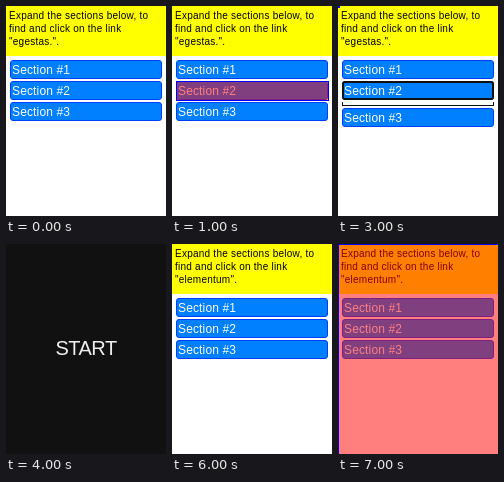
Write an HTML page that moves like this. It is 160 px wide and 210 px high and loops after 8000 ms.

```html
<!DOCTYPE html>
<html lang="en">
<head>
<meta charset="utf-8">
<style>
  html, body { margin: 0; width: 100%; height: 100%; overflow: hidden; background: #fff; }
  * { box-sizing: border-box; font-family: "Liberation Sans", Arial, sans-serif; }
  #stage { position: relative; width: 160px; height: 210px; overflow: hidden; background: #fff; }
  #stage > div { position: absolute; }
  #query { width: 160px; height: 50px; padding: 3px; background: #ff0; font-size: 10px; line-height: 13px;
    letter-spacing: .24px; white-space: nowrap; }
  .section { left: 4px; width: 152px; height: 19px; padding-left: 1px; border: 1px solid #003eff; border-radius: 3px;
    background: #007fff; color: #fff; font-size: 12px; line-height: 19px; letter-spacing: .14px; }
  .focus { outline: 2px solid #101010; outline-offset: -2px; }
  #panel { left: 4px; top: 96px; width: 152px; height: 4px; border: 1px solid #101010; border-top: 0; }
  #cover { width: 160px; height: 210px; background: #111; color: #eee; font-size: 20px; line-height: 208px;
    letter-spacing: -.5px; text-align: center; }
  #mark { background: rgba(255, 0, 0, .5); background-clip: padding-box; border: 1px solid #00f; }
</style>
</head>
<body>
<div id="stage">
  <div id="query">Expand the sections below, to<br>find and click on the link<br>"<span id="word"></span>".</div>
  <div class="section" style="top: 54px">Section #1</div>
  <div class="section" id="second" style="top: 75px">Section #2</div>
  <div id="panel"></div>
  <div class="section" id="third">Section #3</div>
  <div id="cover">START</div>
  <div id="mark"></div>
</div>
<script>
const $ = id => document.getElementById(id);
const STEP = 1000, STEPS = 8;
// Highlight boxes by step: left, top, width, height
const corner = [0, 0, 1, 2];
const marks = { 1: [4, 75, 153, 20], 3: corner, 5: corner, 7: [0, 0, 161, 211] };

function show(el, visible) { el.style.display = visible ? 'block' : 'none'; }

function draw(step) {
  const open = step === 2 || step === 3;
  $('word').textContent = step < 4 ? 'egestas.' : 'elementum';
  $('second').classList.toggle('focus', open);
  $('third').style.top = (open ? 102 : 96) + 'px';
  show($('panel'), open);
  show($('cover'), step === 4 || step === 5);

  const box = marks[step];
  show($('mark'), box);
  if (box) ['left', 'top', 'width', 'height'].forEach((side, i) => $('mark').style[side] = box[i] + 'px');
}

let last = -1;
function tick() {
  const step = Math.floor(performance.now() / STEP) % STEPS;
  if (step !== last) draw(last = step);
  requestAnimationFrame(tick);
}
tick();
</script>
</body>
</html>
```
